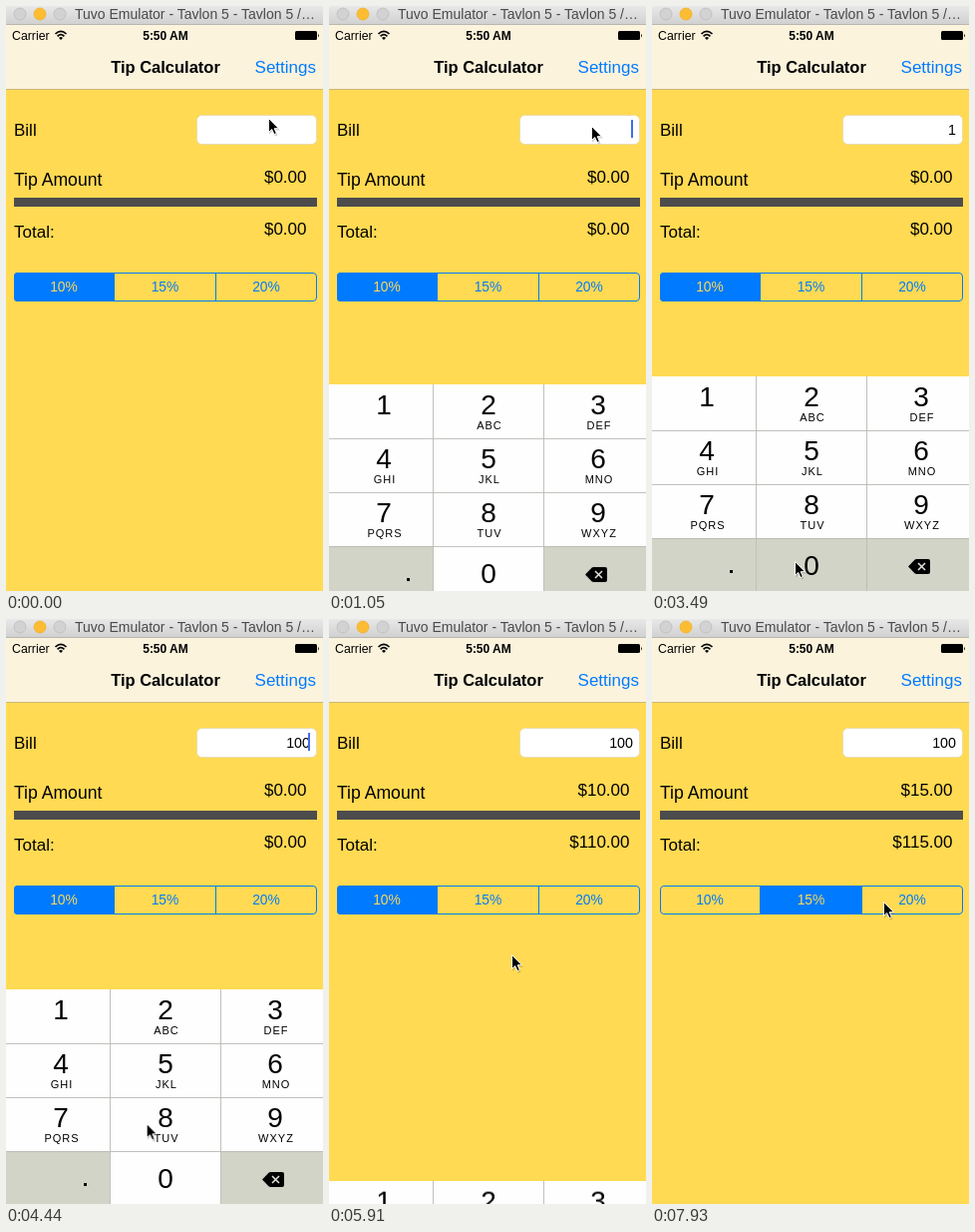
An HTML page for the animation above (8 s loop, 318 by 586 pixels).

```html
<!DOCTYPE html>
<html lang="en">
<head>
<meta charset="utf-8">
<title>Tip Calculator</title>
<style>
  html, body { margin: 0; width: 100%; height: 100%; overflow: hidden; background: #ffda52; }
  svg { display: block; width: 100%; height: 100%; }
  text { font: 17px "Liberation Sans", Arial, sans-serif; fill: #000; }
  .end { text-anchor: end; }
  .mid { text-anchor: middle; }
  .bold { font-weight: bold; font-size: 16.5px; }
  .blue { fill: #007aff; }
  .window { font-size: 14px; fill: #4a4a4a; }
  .status { font-size: 12.3px; }
  .clock { font-size: 12px; font-weight: bold; }
  .caption { font-size: 17.6px; }
  .field { font-size: 14.3px; }
  .segment { font-size: 13.8px; }
  .digit { font-size: 28px; }
  .letters { font-size: 11px; letter-spacing: 1px; }

  .anim { animation: 8s linear infinite; }
  .hard { animation-timing-function: step-end; }

  #pointer { animation-name: pointer; animation-timing-function: ease-in-out; }
  @keyframes pointer {
    0%, 0.6% { transform: translate(263px, 112px); }
    5.5%, 21% { transform: translate(263px, 120px); }
    26.25% { transform: translate(112px, 402px); animation-timing-function: ease-out; }
    30.6%, 35% { transform: translate(82px, 416px); }
    42.5%, 52.8% { transform: translate(143px, 556px); }
    60.9%, 62% { transform: translate(133px, 339px); }
    65.1%, 66.4% { transform: translate(183px, 338px); }
    67.3%, 81% { transform: translate(183px, 336px); }
    84.8%, 94.2% { transform: translate(166.5px, 276px); }
    99.1%, 100% { transform: translate(232px, 283px); }
  }

  #keyboard { animation-name: keyboard; }
  @keyframes keyboard {
    0% { transform: translateY(586px); }
    10.02% { transform: translateY(586px); animation-timing-function: cubic-bezier(.22, .42, .1, 1); }
    14.77% { transform: translateY(371px); }
    71.9% { transform: translateY(371px); animation-timing-function: cubic-bezier(.22, .42, .1, 1); }
    76.1%, 100% { transform: translateY(586px); }
  }

  #caret { animation-name: caret; }
  @keyframes caret {
    0%, 9.8% { opacity: 0; }
    9.9%, 16.1% { opacity: 1; }
    18.6%, 21.1% { opacity: 0; }
    23%, 28.6% { opacity: 1; }
    30.6%, 32.8% { opacity: 0; }
    34%, 40.2% { opacity: 1; }
    42.8%, 45.1% { opacity: 0; }
    45.2%, 58.5% { opacity: 1; }
    60.9%, 62.2% { opacity: 0; }
    65%, 70.3% { opacity: 1; }
    71.8% { opacity: .4; }
    72%, 100% { opacity: 0; }
  }

  #bill1 { animation-name: bill1; }
  #bill10 { animation-name: bill10; }
  #bill100 { animation-name: bill100; }
  @keyframes bill1 { 0%, 45.2%, 100% { opacity: 0; } 34% { opacity: 1; } }
  @keyframes bill10 { 0%, 52.2%, 100% { opacity: 0; } 45.2% { opacity: 1; } }
  @keyframes bill100 { 0% { opacity: 0; } 52.2%, 100% { opacity: 1; } }

  #sum0 { animation-name: sum0; }
  #sum10 { animation-name: sum10; }
  #sum15 { animation-name: sum15; }
  @keyframes sum0 { 0% { opacity: 1; } 72%, 100% { opacity: 0; } }
  @keyframes sum10 { 0%, 89.2%, 100% { opacity: 0; } 72% { opacity: 1; } }
  @keyframes sum15 { 0% { opacity: 0; } 89.2%, 100% { opacity: 1; } }

  #press1 { animation-name: press1; }
  #press0 { animation-name: press0; }
  @keyframes press1 { 0%, 34%, 100% { opacity: 0; } 32.8% { opacity: 1; } }
  @keyframes press0 { 0%, 45.2%, 52.2%, 100% { opacity: 0; } 43.2%, 50% { opacity: 1; } }

  #pick10 { animation-name: pick10; }
  #pick15 { animation-name: pick15; }
  #label10 { animation-name: label10; }
  #label15 { animation-name: label15; }
  @keyframes pick10 { 0%, 89% { opacity: 1; } 91%, 100% { opacity: 0; } }
  @keyframes pick15 {
    0%, 86.4% { opacity: 0; }
    87%, 89% { opacity: .15; }
    91%, 100% { opacity: 1; }
  }
  @keyframes label10 { 0%, 89% { fill: #ffda52; } 91%, 100% { fill: #007aff; } }
  @keyframes label15 { 0%, 89% { fill: #007aff; } 91%, 100% { fill: #ffda52; } }
</style>
</head>
<body>
<svg viewBox="0 0 318 586" preserveAspectRatio="none">
  <defs>
    <linearGradient id="chrome" x2="0" y2="1">
      <stop stop-color="#e9e8e9"/><stop offset="1" stop-color="#d2d1d2"/>
    </linearGradient>
    <clipPath id="rounded"><rect x="8" y="267" width="304" height="29" rx="3.5"/></clipPath>
  </defs>
  <rect width="318" height="586" fill="#ffda52"/>

  <!-- Window and navigation bars -->
  <rect y="18" width="318" height="65" fill="#fbf3dc"/>
  <path d="M0 83.5H318" stroke="#cdb878"/>
  <rect width="318" height="18" fill="url(#chrome)"/>
  <path d="M0 18.5H318" stroke="#b8b6b2"/>
  <g stroke-width=".8">
    <circle cx="14" cy="8" r="6" fill="#d3d2d3" stroke="#bcbbbc"/>
    <circle cx="34" cy="8" r="6" fill="#fdbd32" stroke="#eeb02f"/>
    <circle cx="54" cy="8" r="6" fill="#d3d2d3" stroke="#bcbbbc"/>
  </g>
  <text class="window" x="69" y="13">Tuvo Emulator - Tavlon 5 - Tavlon 5 /…</text>
  <text class="status" x="6" y="34">Carrier</text>
  <g fill="none" stroke="#000" stroke-width="1.7">
    <path d="M49.5 28Q55 22.6 60.5 28M51.6 30.4Q55 27 58.4 30.4"/>
    <path d="M55 34L53 31.9Q55 30.2 57 31.9Z" fill="#000" stroke="none"/>
  </g>
  <text class="clock mid" x="160" y="34">5:50 AM</text>
  <rect x="290" y="25" width="22" height="9" rx="1.5"/>
  <path d="M313 27.5q1.6 2 0 4z"/>
  <text class="bold mid" x="160" y="67">Tip Calculator</text>
  <text class="blue end" x="311" y="67">Settings</text>

  <!-- Form -->
  <text x="8" y="130">Bill</text>
  <text class="caption" x="8" y="180">Tip Amount</text>
  <text x="8" y="232">Total:</text>
  <rect x="191.5" y="109.5" width="120" height="29" rx="5" fill="#fff" stroke="#e9dbaf" stroke-width=".9"/>
  <text id="bill1" class="field end anim hard" x="305" y="129">1</text>
  <text id="bill10" class="field end anim hard" x="305" y="129">10</text>
  <text id="bill100" class="field end anim hard" x="305" y="129">100</text>
  <rect id="caret" class="anim" x="303" y="114" width="2" height="18" fill="#426bf2"/>
  <rect x="8" y="192" width="304" height="9" fill="#4d4c4d"/>
  <g id="sum0" class="end anim hard"><text x="301.5" y="177">$0.00</text><text x="301.5" y="229">$0.00</text></g>
  <g id="sum10" class="end anim hard"><text x="301.5" y="177">$10.00</text><text x="301.5" y="229">$110.00</text></g>
  <g id="sum15" class="end anim hard"><text x="301.5" y="177">$15.00</text><text x="301.5" y="229">$115.00</text></g>

  <!-- Tip rate -->
  <g clip-path="url(#rounded)" fill="#007aff">
    <rect id="pick10" class="anim" x="8" y="267" width="101" height="29"/>
    <rect id="pick15" class="anim" x="108" y="267" width="103" height="29"/>
  </g>
  <rect x="8.5" y="267.5" width="303" height="28" rx="3.5" fill="none" stroke="#007aff"/>
  <path d="M108.5 267V296M210.5 267V296" stroke="#007aff"/>
  <text id="label10" class="segment mid anim" x="58" y="286">10%</text>
  <text id="label15" class="segment mid anim" x="159.5" y="286">15%</text>
  <text class="segment mid blue" x="261" y="286">20%</text>

  <g id="keyboard" class="anim">
    <rect width="318" height="216" fill="#fefefe"/>
    <path d="M0 162H104V216H0ZM216 162H318V216H216Z" fill="#d2d4c7"/>
    <rect id="press1" class="anim hard" width="104" height="54" fill="#d2d4c7"/>
    <rect id="press0" class="anim hard" x="105" y="162" width="111" height="54" fill="#d2d4c7"/>
    <path d="M0 54.5H318M0 108.5H318M0 162.5H318M104.5 0V216M215.5 0V216" stroke="#b9bab5" stroke-width=".9"/>
    <g id="keys"></g>
    <rect x="78" y="194" width="3" height="3"/>
    <g transform="translate(257 183)">
      <path d="M0 7.5L6.500 .8Q7.300 0 8.500 0H20Q22 0 22 2V13Q22 15 20 15H8.500Q7.300 15 6.500 14.200Z"/>
      <path d="M10 4l7 7m0-7l-7 7" stroke="#e4e5dc" stroke-width="1.5"/>
    </g>
  </g>

  <g id="pointer" class="anim">
    <path d="M1 2V16.500L4.500 13.500 7 18.500 9.500 17.500 7.500 12.500H12z" opacity=".18"/>
    <path d="M.5 .5V14.500L3.700 11.600 6 16.600 8.400 15.500 6.200 10.700H10.500Z" stroke="#fff"/>
  </g>
</svg>
<script>
  const keys = document.getElementById("keys");
  const centers = [55, 160, 270];
  const letters = ["", "ABC", "DEF", "GHI", "JKL", "MNO", "PQRS", "TUV", "WXYZ"];

  function addText(className, x, y, content) {
    const node = document.createElementNS("http://www.w3.org/2000/svg", "text");
    node.setAttribute("class", className + " mid");
    node.setAttribute("x", x);
    node.setAttribute("y", y);
    node.textContent = content;
    keys.append(node);
  }

  letters.forEach((label, i) => {
    const x = centers[i % 3], top = Math.floor(i / 3) * 54;
    addText("digit", x, top + 30, i + 1);
    addText("letters", x + 1, top + 45, label);
  });
  addText("digit", 160, 199, 0);
</script>
</body>
</html>
```
